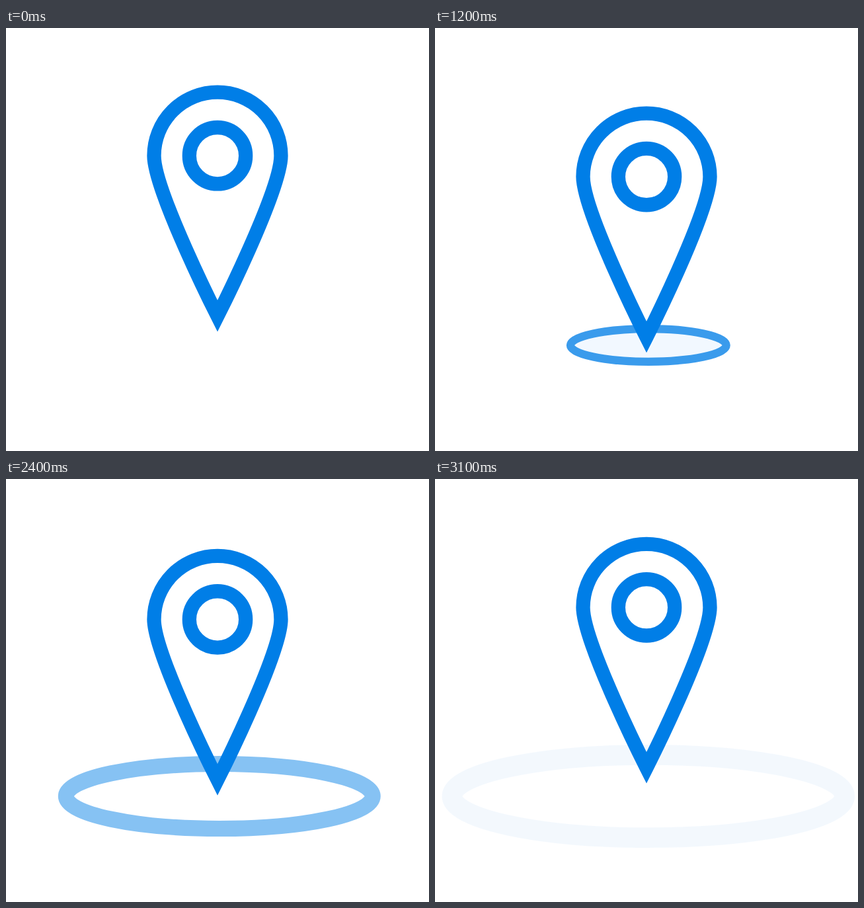
Animation, 640 px wide and 640 px high, one loop 3200 ms. Source, as an HTML page:

```html
<!DOCTYPE html>
<html lang="en">
<head>
<meta charset="utf-8">
<title>Map pin pulse</title>
<style>
  html, body { margin: 0; width: 100%; height: 100%; overflow: hidden; background: #fff; }
  svg { display: block; width: 100%; height: 100%; }
</style>
</head>
<body>
<svg viewBox="0 0 640 640" fill="none" stroke="#007ee7">
  <g id="ring">
    <ellipse id="disc" rx="270" ry="57" fill="#007ee7" stroke-width="28"/>
  </g>
  <g id="pin" stroke-width="21.33" stroke-miterlimit="10">
    <path d="M416 193.2C416 246.2 320 435.8 320 435.8S224 246.2 224 193.2A96 96 0 0 1 416 193.2Z"/>
    <circle cx="320" cy="193.2" r="42.67"/>
  </g>
</svg>
<script>
  const LOOP = 3200, STEP = 100;   // ms
  const HALF = 1.5625;             // seconds down, then the same back up
  const LAST = 3.0833;             // motion stops here until the loop restarts
  const DROP = 41.5;

  const [ring, disc, pin] = ['ring', 'disc', 'pin'].map(id => document.getElementById(id));

  function draw(ms) {
    const t = Math.min(Math.floor(ms % LOOP / STEP) * STEP / 1000, LAST);
    const drop = DROP * (1 - Math.abs(t / HALF - 1));
    const scale = (8 + 200 * t) / 568;
    const opacity = t < HALF ? t / HALF : (3.15 - t) / 1.5875;

    pin.setAttribute('transform', `translate(0 ${drop})`);
    ring.setAttribute('transform', `translate(322.8 480) scale(${scale})`);
    ring.setAttribute('opacity', opacity);
    disc.setAttribute('fill-opacity', Math.max(0, 0.3 * (1 - t / HALF)));
  }

  const start = performance.now();
  function tick() {
    draw(performance.now() - start);
    requestAnimationFrame(tick);
  }
  tick();
</script>
</body>
</html>
```
